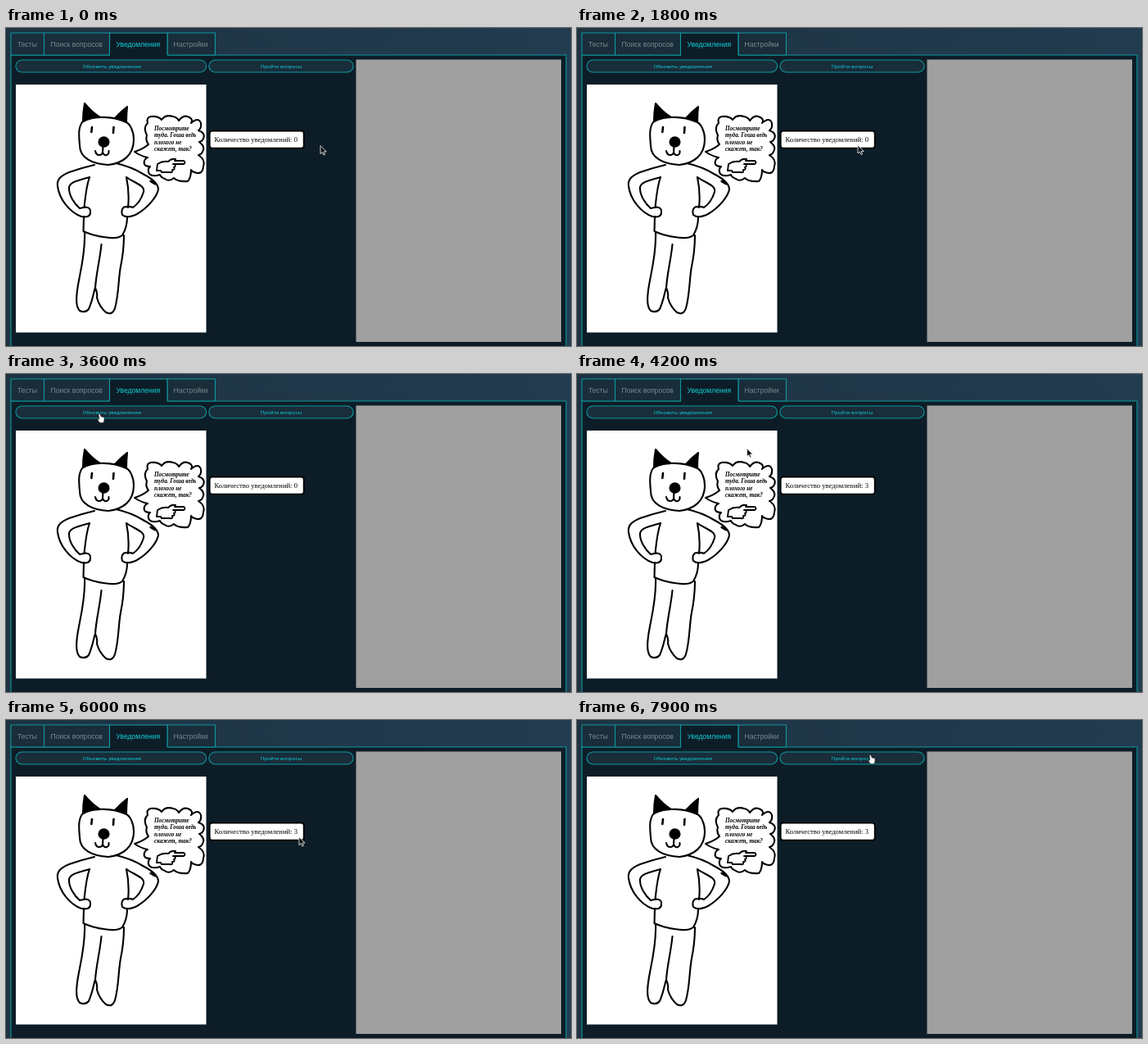
These frames come from a looping animation (690 by 388 pixels, 8 s). An HTML page:

```html
<!DOCTYPE html>
<html lang="ru">
<head>
<meta charset="utf-8">
<style>
html, body { margin: 0; width: 100%; height: 100%; overflow: hidden; background: #0d1d27; }
svg { display: block; }
text { white-space: pre; }
.line { stroke: #0e989e; stroke-width: 1.1; }
.tab { font: 8.6px "Liberation Sans", Arial, sans-serif; fill: #7c888d; }
.on { fill: #10cdd5; }
.btn { font: 6.1px "Noto Sans", "Open Sans", sans-serif; fill: #10cdd5; text-anchor: middle; }
.count { font: 8.6px "Liberation Serif", serif; }
.say { font: italic bold 7.2px "Liberation Serif", serif; }
.ink { fill: none; stroke: #000; stroke-width: 2.1; stroke-linecap: round; stroke-linejoin: round; }
</style>
</head>
<body>
<svg width="690" height="388" viewBox="0 0 690 388">
  <defs>
    <linearGradient id="sky" x2="1" y2="0">
      <stop stop-color="#1d3342"/><stop offset="1" stop-color="#223c50"/>
    </linearGradient>
  </defs>
  <rect width="690" height="388" fill="url(#sky)"/>
  <path class="line" fill="#0d1d27" d="M6 390V33H684V390"/>

  <g class="line" fill="#192d3a">
    <path d="M6 33V6H46.5V33ZM46.5 33V6H126.5V33ZM197 33V6H255.5V33Z"/>
    <path fill="#0d1d27" stroke="none" d="M127 7H197V35H127Z"/>
    <path fill="none" d="M126.5 33V6H197V33"/>
    <rect x="12" y="39" width="232.5" height="15" rx="8" ry="7"/>
    <rect x="248" y="39" width="176" height="15" rx="8" ry="7"/>
  </g>
  <g class="tab">
    <text x="14" y="23">Тесты</text>
    <text x="54.5" y="23">Поиск вопросов</text>
    <text class="on" x="134.5" y="23.3">Уведомления</text>
    <text x="204.5" y="23">Настройки</text>
  </g>
  <text class="btn" x="129.2" y="48.8">Обновить уведомления</text>
  <text class="btn" x="336" y="48.8">Пройти вопросы</text>

  <path fill="#a0a0a0" d="M427.5 38.5H678V383H427.5Z"/>
  <path fill="#fff" d="M12 69H244.5V371.5H12Z"/>

  <!-- cat -->
  <g class="ink">
    <path fill="#000" d="M96 92Q105 103 115 109Q104 109 94 114Q94 103 96 92ZM148 96Q139 103 133 110Q142 111 147 115Q147 105 148 96Z"/>
    <path d="M115 109Q100 109 93 115C88 122 89 132 90 143C90 159 106 166 125 167C143 165 156 155 156 136C156 125 151 117 147 115Q132 108 115 109"/>
    <path stroke-width="2.6" d="M105 121L104.300 127M131.500 121L131 128"/>
    <ellipse cx="119.500" cy="139" rx="6" ry="5.700" fill="#000"/>
    <path d="M118.500 144L118 152M109 150Q110 155 114 155Q117 155 118 152Q120 156 123 155Q126 154 125.500 150"/>
    <path d="M108 167Q91 171 77 176C65 181 62 186 63 193C65 209 78 225 92 230Q103 232 103 225Q104 219 97 218.500L90 220C83 214 77 204 77 196C76 188 88 186 102 182"/>
    <path d="M102 182C98 193 97 205 95.500 219M95 230L94.500 248Q105 253 119 255Q135 258 142 253Q148 243 148 231M147 182Q151 201 149 219"/>
    <path d="M134 165Q153 169 169 179Q186 188 186 197C184 207 172 220 160 227Q148 233 142 228Q140 222 144 218.500Q151 217 155 219Q164 213 168 200C170 192 157 189 147 182"/>
    <path stroke-width="3" d="M177 187L182 190"/>
    <path d="M96 249C97 271 92 293 89 308C86 324 84 339 90 345Q97 348 101 343C106 332 107 322 109 317C110 300 115 281 116.500 264M109 317Q112 323 111 329Q114 340 122 347Q130 351 133 342C138 324 137 307 140 291Q144 272 144 253"/>
    <path d="M157 151Q167 148 174 142Q170 137 172 131Q167 121 173 116Q171 109 177 108Q186 107 190 112Q195 105 204 108Q209 109 211 113Q217 105 224 109Q229 112 226 116Q235 108 238 116Q239 122 235 125Q244 128 241 135Q240 138 236 139Q244 145 240 151Q239 154 235 155Q244 161 241 169Q240 180 230 176Q227 175 226 173Q226 183 222 187Q210 188 205 183Q199 188 194 184Q189 182 188 179Q179 182 175 178Q172 173 176 169Q167 169 169 162Q170 159 173 158Q164 156 157 151Z"/>
    <path stroke-width="1.900" d="M184 174L185 166Q191 162 198 163Q202 159 207 160L206 162L217 162Q220 164 217 166L204 166M206 166Q208 169 205 170Q207 173 203 173Q204 177 200 176L190 176L189 174L184 174"/>
  </g>
  <g class="say">
    <text x="181" y="124.500">Посмотрите</text>
    <text x="181" y="133">туда. Гоша ведь</text>
    <text x="181" y="141.500">плохого не</text>
    <text x="181" y="150">скажет, так?</text>
  </g>

  <rect x="248.700" y="125.700" width="115" height="21" rx="3" fill="#fff" stroke="#000" stroke-width="1.800"/>
  <text class="count" x="254.500" y="139">Количество уведомлений: <tspan id="num">0</tspan></text>

  <g id="cursor">
    <path id="arrow" fill="#0b0f12" stroke="#fff" stroke-width=".8" d="M0 0V10L2.300 8L4 11.500L5.600 10.700L4 7.400H7.200Z"/>
    <path id="hand" fill="#fff" stroke="#111" stroke-width=".5" d="M-1 0Q0-1 1 0L2 3L5 3.500Q6.500 4 6 7L5 10.500H.5L-2 7Q-2.500 5.500 0 6Z"/>
  </g>
</svg>
<script>
// time, x, y of the pointer tip
const path = [
  [0, 384, 143.5], [700, 382, 143.5], [900, 373, 143], [1100, 255.5, 142.5],
  [1300, 258, 143], [1800, 343, 143], [2100, 300, 112], [2500, 185, 42],
  [2700, 114, 49], [3900, 114, 49], [4500, 300, 132], [4700, 362, 146],
  [5000, 356, 144], [5900, 358, 143], [6500, 356, 137.5], [7250, 356, 137.5],
  [7500, 384, 95], [7800, 358, 43], [8000, 358, 43]
];
const el = id => document.getElementById(id);
const num = el('num'), cursor = el('cursor'), arrow = el('arrow'), hand = el('hand');

function place(t) {
  const i = path.findIndex(p => p[0] > t);
  const [t0, x0, y0] = path[i - 1], [t1, x1, y1] = path[i];
  const u = (t - t0) / (t1 - t0), k = u * u * (3 - 2 * u);
  return [x0 + (x1 - x0) * k, y0 + (y1 - y0) * k];
}

function draw(now) {
  const t = now % 8000, [x, y] = place(t);
  const overButton = y < 54 && x < 424;
  cursor.setAttribute('transform', `translate(${x} ${y})`);
  arrow.style.display = overButton ? 'none' : '';
  hand.style.display = overButton ? '' : 'none';
  num.textContent = t < 3900 ? 0 : 3;
  requestAnimationFrame(draw);
}
draw(0);
</script>
</body>
</html>
```
